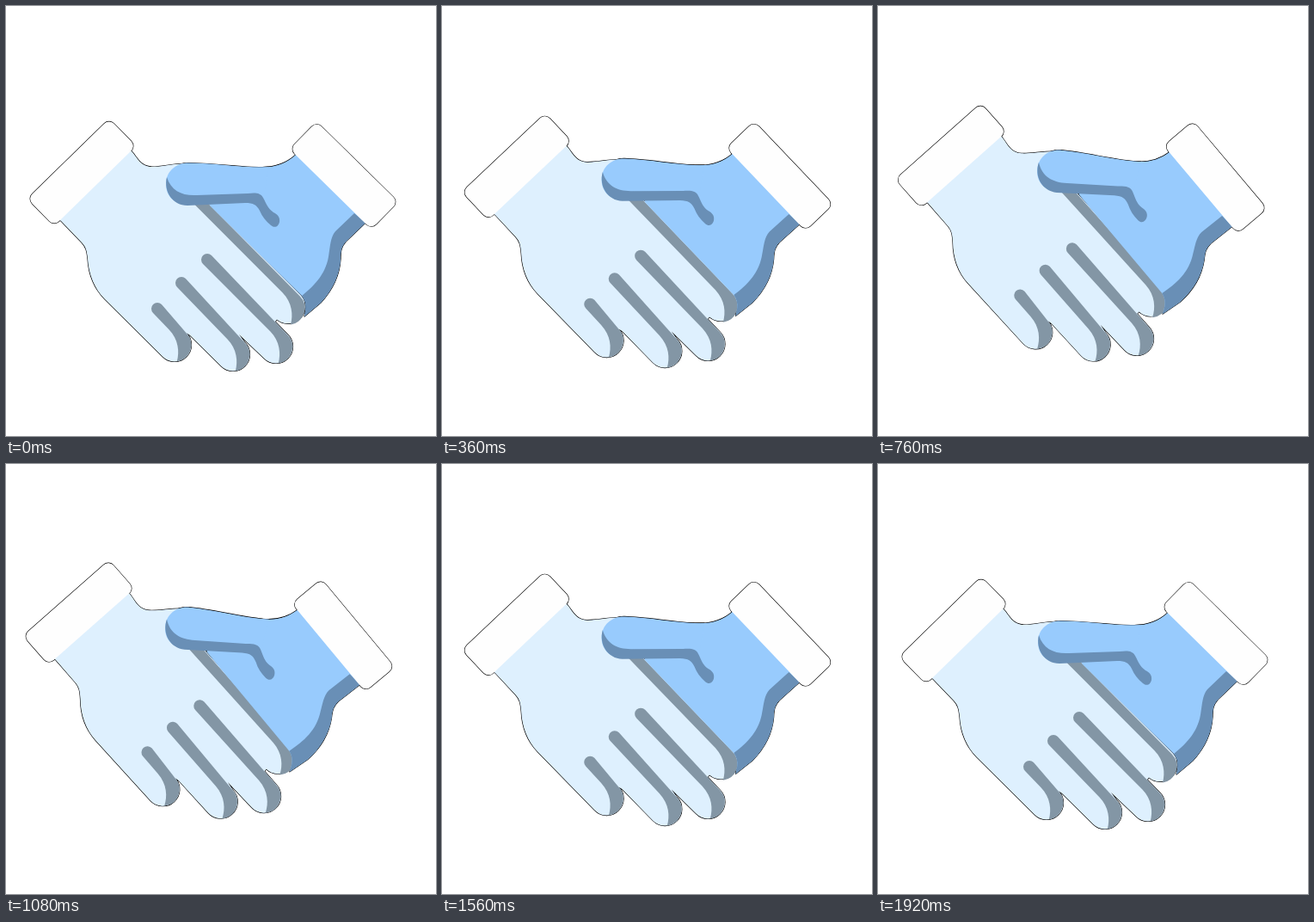
An HTML page with a canvas for the animation above (1.96 s loop, 500x500 px).

```html
<!DOCTYPE html>
<html lang="en">
<head>
<meta charset="utf-8">
<title>Handshake</title>
<style>
html, body { margin: 0; width: 100%; height: 100%; overflow: hidden; background: #fff; }
canvas { display: block; width: 500px; height: 500px; }
</style>
</head>
<body>
<canvas id="stage" width="500" height="500"></canvas>
<script>
const ctx = document.getElementById('stage').getContext('2d');
const PALE = '#def0fe', GREY = '#8396a5', BLUE = '#98cbfd', DARK = '#698fb6', CUFF = '#fefefe';
const FRAME = 40, LOOP = 1960, SWING = 1920;

function cuff(x, y, angle) {
  const box = new Path2D(), path = new Path2D();
  box.roundRect(-66.5, -22.3, 133, 44.6, 8);
  path.addPath(box, new DOMMatrix().translate(x, y).rotate(angle));
  return path;
}

// Shaded side of a finger: groove start (gx, gy), fingertip centre (x, y)
function shade(gx, gy, x, y, r = 7) {
  const d = r * Math.SQRT1_2;
  return new Path2D(`M${gx + d} ${gy - d} L${x + 13.8} ${y - 13.8}
    A19.5 19.5 0 0 1 ${x + 3} ${y + 19.2}
    C${x + 6} ${y + 8} ${x + 5} ${y - 6} ${x - 6.5} ${y - 18}
    L${gx - d} ${gy + d} A${r} ${r} 0 0 1 ${gx + d} ${gy - d}Z`);
}

const leftHand = new Path2D(`M147 170 L142 165 L58 246 L64 250 L88 275
  C93 280 94 285 95 294 C96 312 103 329 115 341 L182.2 407.8
  A19.5 19.5 0 0 0 209.8 380.2 L214 383 L250.2 418.8
  A19.5 19.5 0 0 0 277.8 391.2 L271 382 L300.2 409.8
  A19.5 19.5 0 0 0 327.8 382.2 L313 367 L315 364.6
  A19.9 19.9 0 0 0 343 336.5 L237 230.5 L212 190
  L212 183 C195 183 182 187 170 187 C157 187 153 177 147 170Z`);
const shades = [
  shade(223, 226, 328, 351.3, 6),
  shade(234, 295, 313.7, 396.2),
  shade(204, 322, 263.8, 405.2),
  shade(176, 352, 195.8, 394)
];
const leftCuff = cuff(88, 193.5, -44.3);

const fingerEdge = 'L344 337 Q349 343 348.5 352 L347 361';
const outerSide = `L366 345 C380 330 388 312 389 294
  C389 284 390 280 395 274 L418 252`;
const rightHand = new Path2D(`M342 168 L337 173 C326 183 314 187.5 298 187.5
  L240 190 L237 232 ${fingerEdge} ${outerSide}Z`);
const rightSide = new Path2D(`M405 241 L383 262 C377 269 377 280 375.5 288
  C373 310 360 324 344 337 ${fingerEdge} ${outerSide}Z`);
const thumbTop = new Path2D(`M305 187.3 L298 187.5 C270 187.5 240 182.5 212 182.5
  C197 182.5 186 193 186 207 C186 221 196 231 211 231 L278 228 L300 224Z`);
const thumbSide = new Path2D(`M187 199 C183 216 194 232 211 232 L278 229
  C288 229 291 231 295 238 C298 245 302 250 308 255
  C313 259 317 256 318 251 C319 245 315 242 311 240
  C304 235 303 230 299 223 C296 217 290 217 281 218
  L222 220 C205 221 192 215 187 199Z`);
const rightCuff = cuff(393, 197, 44.5);

function turned(x, y, degrees, draw) {
  ctx.save();
  ctx.translate(x, y);
  ctx.rotate(degrees * Math.PI / 180);
  ctx.translate(-x, -y);
  draw();
  ctx.restore();
}

function fill(color, ...paths) {
  ctx.fillStyle = color;
  paths.forEach(path => ctx.fill(path));
}

function outline(...paths) {
  ctx.strokeStyle = '#000';
  ctx.lineWidth = 1.2;
  paths.forEach(path => ctx.stroke(path));
}

function render(now) {
  const time = Math.floor(now % LOOP / FRAME) * FRAME;
  const swing = (1 - Math.cos(2 * Math.PI * time / SWING)) / 2;
  const left = draw => turned(502, 115, 3 * swing, draw);
  const right = draw => turned(370, 190, 6 * swing, draw);

  ctx.clearRect(0, 0, 500, 500);
  ctx.lineJoin = 'round';

  // Only the outer half of these outlines stays visible
  left(() => outline(leftHand, leftCuff));
  right(() => outline(rightHand, rightCuff, thumbTop));

  left(() => {
    fill(PALE, leftHand);
    fill(GREY, ...shades);
    fill(CUFF, leftCuff);
  });
  right(() => {
    fill(BLUE, rightHand, thumbTop);
    fill(DARK, rightSide, thumbSide);
    fill(CUFF, rightCuff);
  });
}

const start = performance.now();
function tick() {
  render(performance.now() - start);
  requestAnimationFrame(tick);
}
tick();
</script>
</body>
</html>
```
